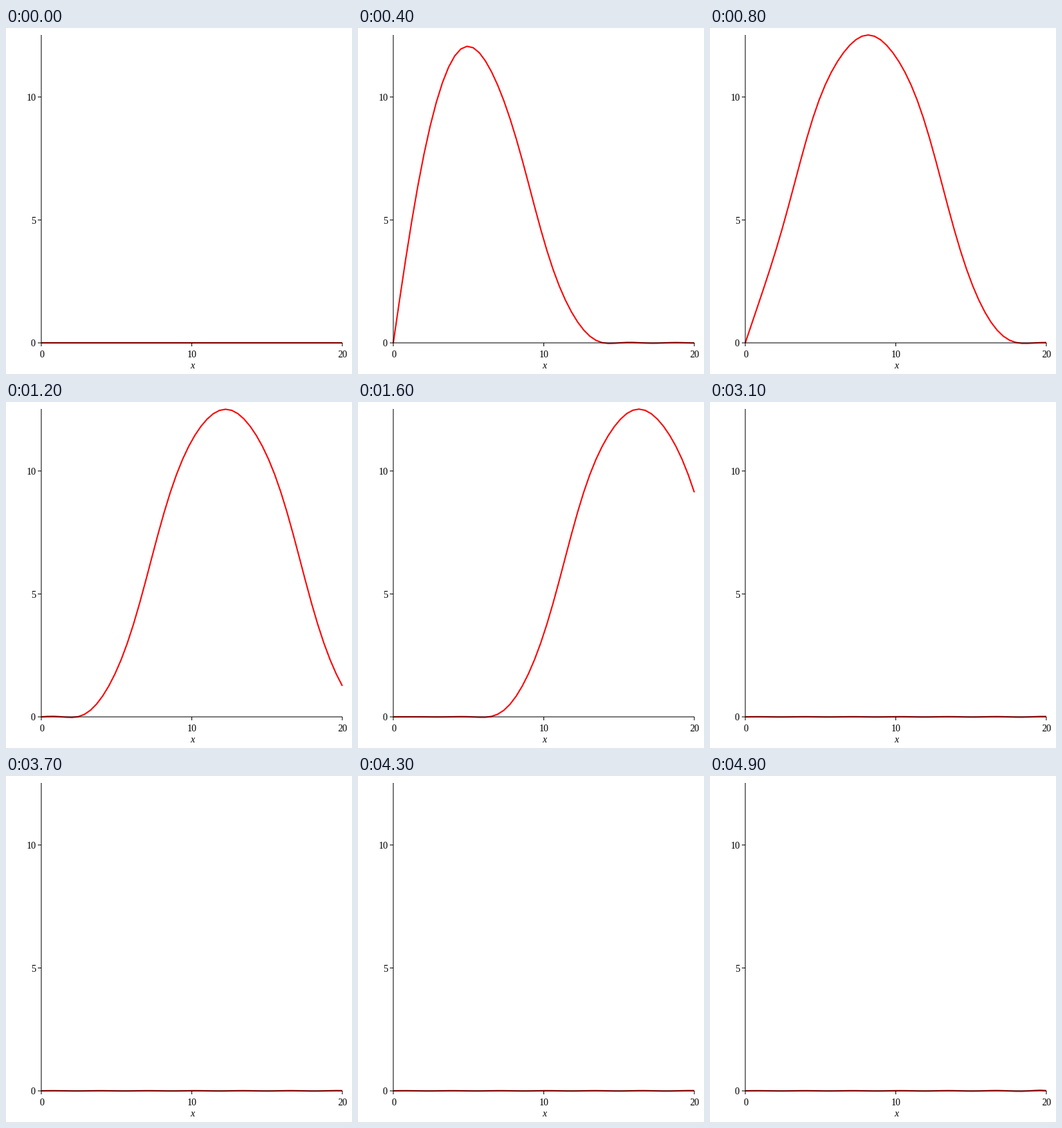
A matplotlib script for the animation above (5000 ms loop, 500 by 500 pixels).

```python
import numpy as np
import matplotlib.pyplot as plt
from matplotlib.animation import FuncAnimation
from matplotlib.collections import LineCollection

FRAMES, INTERVAL = 50, 100
PX = 0.72                      # points per pixel at 100 dpi
LEFT, RIGHT, TOP, BOTTOM = 51, 486, 10, 455
LENGTH, TERMS, X_MAX, T_MAX = 40, 25, 20, 50

# Wave on a fixed string struck with a triangular velocity profile on [0, 10],
# as a truncated sine series.
x = np.linspace(0, X_MAX, 50)
times = np.linspace(0, T_MAX, FRAMES)
w = np.arange(1, TERMS + 1) * np.pi / LENGTH
coef = 2 / LENGTH * (2 * np.sin(5 * w) - np.sin(10 * w)) / w**3
waves = (np.sin(np.outer(times, w)) * coef) @ np.sin(np.outer(w, x))
y_max = waves.max()


def to_px(value):
    return LEFT + (RIGHT - LEFT) * value / X_MAX


def to_py(value):
    return BOTTOM - (BOTTOM - TOP) * value / y_max


fig = plt.figure(figsize=(5, 5), dpi=100, facecolor="white")
ax = fig.add_axes([0, 0, 1, 1])
ax.set(xlim=(0, 500), ylim=(500, 0))
ax.axis("off")


def label(px, baseline, text, ha="center", style="normal"):
    ax.text(px, baseline, text, ha=ha, va="baseline", style=style,
            family="Liberation Serif", fontsize=14 * PX, color="black")


curve, = ax.plot([], [], color="red", lw=2 * PX, solid_capstyle="butt",
                 solid_joinstyle="round", snap=False, zorder=2)

segments = [[(LEFT, TOP), (LEFT, BOTTOM)], [(LEFT, BOTTOM), (RIGHT, BOTTOM)]]
for value in (0, 10, 20):
    px = to_px(value)
    segments.append([(px, BOTTOM), (px, BOTTOM + 5)])
    label(px + 0.5, 476, str(value))
for value, right in ((0, 42), (5, 43.5), (10, 43.5)):
    py = to_py(value)
    segments.append([(LEFT - 5, py), (LEFT, py)])
    label(right, py + 5.5, str(value), ha="right")
label(268.8, 492, "x", style="italic")

axes_lines = LineCollection(segments, colors="black", linewidths=PX,
                            capstyle="butt", zorder=3)
axes_lines.set_snap(False)
ax.add_collection(axes_lines, autolim=False)


def update(i):
    curve.set_data(to_px(x), to_py(waves[i]))
    return curve,


anim = FuncAnimation(fig, update, frames=FRAMES, interval=INTERVAL,
                     repeat=True, repeat_delay=0)
plt.show()
```
